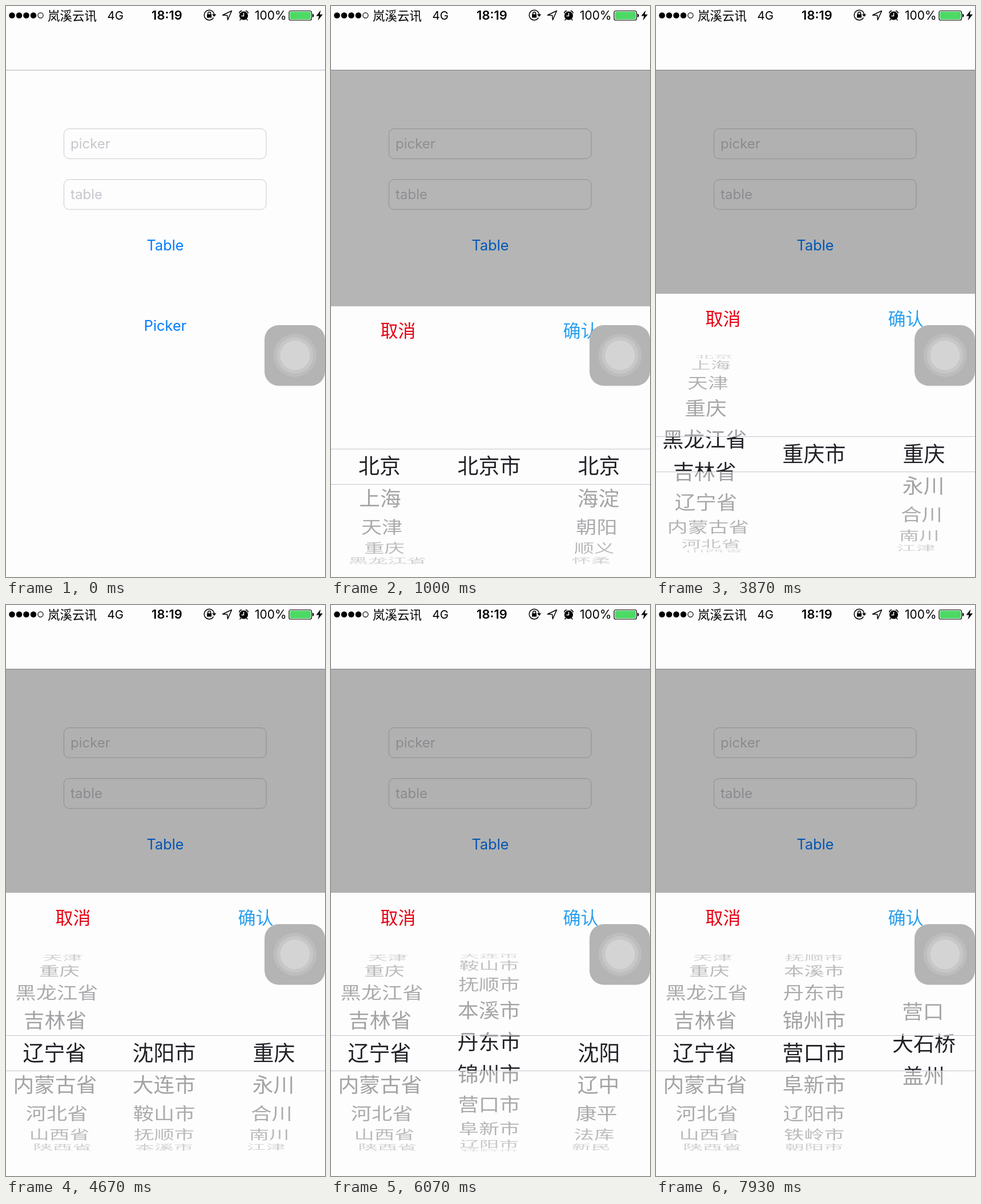
An HTML page for the animation above (8000 ms loop, 559 by 1002 pixels).

```html
<!DOCTYPE html>
<html lang="zh">
<head>
<meta charset="utf-8">
<title>Region picker</title>
<style>
  html, body { margin: 0; width: 100%; height: 100%; overflow: hidden; background: #fdfdfd; }
  svg { display: block; width: 100vw; height: 100vh; }
  text { font-family: Inter, "Noto Sans CJK SC", "Noto Sans CJK", sans-serif; white-space: pre; }
  .cjk { font-family: "Noto Sans CJK SC", "Noto Sans CJK", sans-serif; }
  .mid, .wheel text { text-anchor: middle; }
  .field rect { fill: #fdfdfd; stroke: #c9c9d0; stroke-width: 1; }
  .field text { font-size: 24px; fill: #c6c6cc; }
  .button { font-size: 25.3px; fill: #007aff; }
  .action { font-size: 31px; }
  .wheel text { font-size: 37px; }
  .far { fill: #a0a0a3; clip-path: url(#outside); }
  .near { fill: #202026; clip-path: url(#inside); }
  .line { fill: none; stroke: #000; stroke-width: 1.5; }
</style>
</head>
<body>
<svg viewBox="0 0 559 1002" preserveAspectRatio="none">
  <defs>
    <clipPath id="inside"><rect y="755.5" width="559" height="62"/></clipPath>
    <clipPath id="outside"><path d="M0 612H559V755.5H0ZM0 817.5H559V959H0Z"/></clipPath>
  </defs>
  <rect width="559" height="1002" fill="#fdfdfd"/>

  <g class="field">
    <rect x="101.5" y="215.5" width="354.5" height="52.5" rx="9"/>
    <text x="113" y="249.5">picker</text>
    <rect x="101.5" y="304.5" width="354.5" height="52.5" rx="9"/>
    <text x="113" y="338.5">table</text>
  </g>
  <text class="button mid" x="279" y="429">Table</text>
  <text class="button mid" x="279" y="569.5">Picker</text>
  <path d="M0 112.5H559" stroke="#b0b0b8"/>
  <rect id="dim" y="112" width="559" height="890" opacity="0"/>

  <g id="sheet" transform="translate(0 498)">
    <rect y="505" width="559" height="498" fill="#fdfdfd"/>
    <text class="action cjk" x="86.5" y="559.5" fill="#e60012">取消</text>
    <text class="action cjk" x="406.5" y="559.5" fill="#2a9ff0">确认</text>
    <g class="wheel cjk">
      <g class="far"></g>
      <g class="near"></g>
    </g>
    <path d="M0 755.5H559M0 817.5H559" stroke="#c6c6ce"/>
  </g>

  <!-- floating touch button -->
  <rect x="453" y="560" width="106" height="106.5" rx="25" fill="#b4b4b4"/>
  <g fill="#e2e2e4">
    <circle cx="506.5" cy="613" r="38" opacity=".18"/>
    <circle cx="506.5" cy="613" r="32" opacity=".25"/>
    <circle cx="506.5" cy="613" r="26" opacity=".45"/>
  </g>

  <!-- status bar -->
  <g>
    <circle cx="10.5" cy="16.5" r="5.3"/>
    <circle cx="23" cy="16.5" r="5.3"/>
    <circle cx="35.5" cy="16.5" r="5.3"/>
    <circle cx="48" cy="16.5" r="5.3"/>
    <circle cx="60.5" cy="16.5" r="4.6" class="line" style="stroke-width:1.2"/>
    <text class="cjk" x="73" y="24.8" font-size="21.5">岚溪云讯</text>
    <text x="177.5" y="24" font-size="20.5">4G</text>
    <text class="mid" x="282" y="24" font-size="22" font-weight="600">18:19</text>
    <path class="line" d="M363.5 20.5A8.7 8.7 0 1 1 364.7 15M353.8 15V13A2.4 2.4 0 0 1 358.6 13V15"/>
    <path d="M361 14.5H368.5L364.8 19ZM352.2 14.5H360.2V20.5H352.2Z"/>
    <path class="line" d="M379.5 16L395.5 8.5L388.5 24.5L387.8 16.5Z" stroke-linejoin="round"/>
    <circle cx="416.5" cy="17" r="7.6"/>
    <path class="line" stroke-linecap="round" d="M408.8 12.2Q409.5 9.3 412.6 8.6M424.2 12.2Q423.5 9.3 420.4 8.6M411.5 23L410 24.8M421.5 23L423 24.8"/>
    <path d="M416.5 12V17.5H412.5" fill="none" stroke="#fdfdfd" stroke-width="1.5"/>
    <text x="436" y="24" font-size="21">100%</text>
    <rect class="line" x="496" y="8.5" width="39.5" height="16.5" rx="3" style="stroke-width:1.2"/>
    <rect x="497.6" y="10.1" width="36.3" height="13.3" rx="1.6" fill="#4cd964"/>
    <path d="M537 13.5Q539.5 14 539.5 16.8T537 20Z"/>
    <path d="M551.5 7.5L543.5 17.5H548.5L546.5 25.5L555 14.8H549.8Z"/>
  </g>
</svg>
<script>
const LOOP = 8000, FPS = 15;
const CENTER_X = 279.5, CENTER_Y = 785.5;
const STEP = 17.3 * Math.PI / 180, RADIUS = 191, DEPTH = 1590;
const REACH = 5;

const list = names => names.split(" ");
const provinces = list("北京 上海 天津 重庆 黑龙江省 吉林省 辽宁省 内蒙古省 河北省 山西省 陕西省 甘肃省");
const cities = {
  beijing: ["北京市"],
  chongqing: ["重庆市"],
  liaoning: list("沈阳市 大连市 鞍山市 抚顺市 本溪市 丹东市 锦州市 营口市 阜新市 辽阳市 铁岭市 朝阳市 盘锦市")
};
const districts = {
  beijing: list("北京 海淀 朝阳 顺义 怀柔"),
  chongqing: list("重庆 永川 合川 南川 江津"),
  shenyang: list("沈阳 辽中 康平 法库 新民"),
  yingkou: list("营口 大石桥 盖州")
};

const progress = (t, start, length) => Math.min(1, Math.max(0, (t - start) / length));
const smooth = p => p * p * (3 - 2 * p);
// Exponential slow-down of a flicked wheel, from 0 to 1
const fling = (t, start, length) =>
  (1 - Math.exp(-5 * progress(t, start, length))) / (1 - Math.exp(-5));

const columns = [
  { x: 85,
    items: () => provinces,
    pos: t => 3 * fling(t, 2617, 1000) + 3 * fling(t, 3750, 900) },
  { x: 277,
    items: t => t < 3617 ? cities.beijing : t < 4650 ? cities.chongqing : cities.liaoning,
    pos: t => 7 * fling(t, 5530, 1900) },
  { x: 469.5,
    items: t => t < 3617 ? districts.beijing : t < 4740 ? districts.chongqing
      : t < 7430 ? districts.shenyang : districts.yingkou,
    pos: t => 2 * fling(t, 7667, 1300) }
];

const sheet = document.getElementById("sheet");
const dim = document.getElementById("dim");
const layers = [...document.querySelectorAll(".wheel > g")];

function addRow(layer) {
  const row = document.createElementNS("http://www.w3.org/2000/svg", "text");
  row.setAttribute("class", "cjk");
  row.setAttribute("y", 14);
  return layer.appendChild(row);
}
for (const col of columns) {
  col.rows = Array.from({ length: 2 * REACH + 1 }, () => layers.map(addRow));
}

function placeRow(row, name, x, offset) {
  const angle = offset * STEP;
  const shown = name && Math.abs(angle) < Math.PI / 2;
  row.textContent = shown ? name : "";
  if (!shown) return;
  const scale = 1 / (1 + RADIUS * (1 - Math.cos(angle)) / DEPTH);
  const left = CENTER_X + (x - CENTER_X) * scale;
  const top = CENTER_Y + RADIUS * Math.sin(angle) * scale;
  row.setAttribute("transform",
    `translate(${left} ${top}) scale(${scale} ${scale * Math.cos(angle)})`);
  row.setAttribute("opacity", 1 - 0.8 * (offset / REACH) ** 2);
}

function draw(t) {
  const open = smooth(progress(t, 738, 300));
  sheet.setAttribute("transform", `translate(0 ${498 * (1 - open)})`);
  dim.setAttribute("opacity", 0.3 * open);
  for (const col of columns) {
    const items = col.items(t), pos = col.pos(t), first = Math.round(pos) - REACH;
    col.rows.forEach((pair, i) => {
      const index = first + i;
      for (const row of pair) placeRow(row, items[index], col.x, index - pos);
    });
  }
}

function tick() {
  const t = performance.now() % LOOP;
  draw(Math.floor((t + 4) * FPS / 1000) * 1000 / FPS % LOOP);
  requestAnimationFrame(tick);
}
tick();
</script>
</body>
</html>
```
